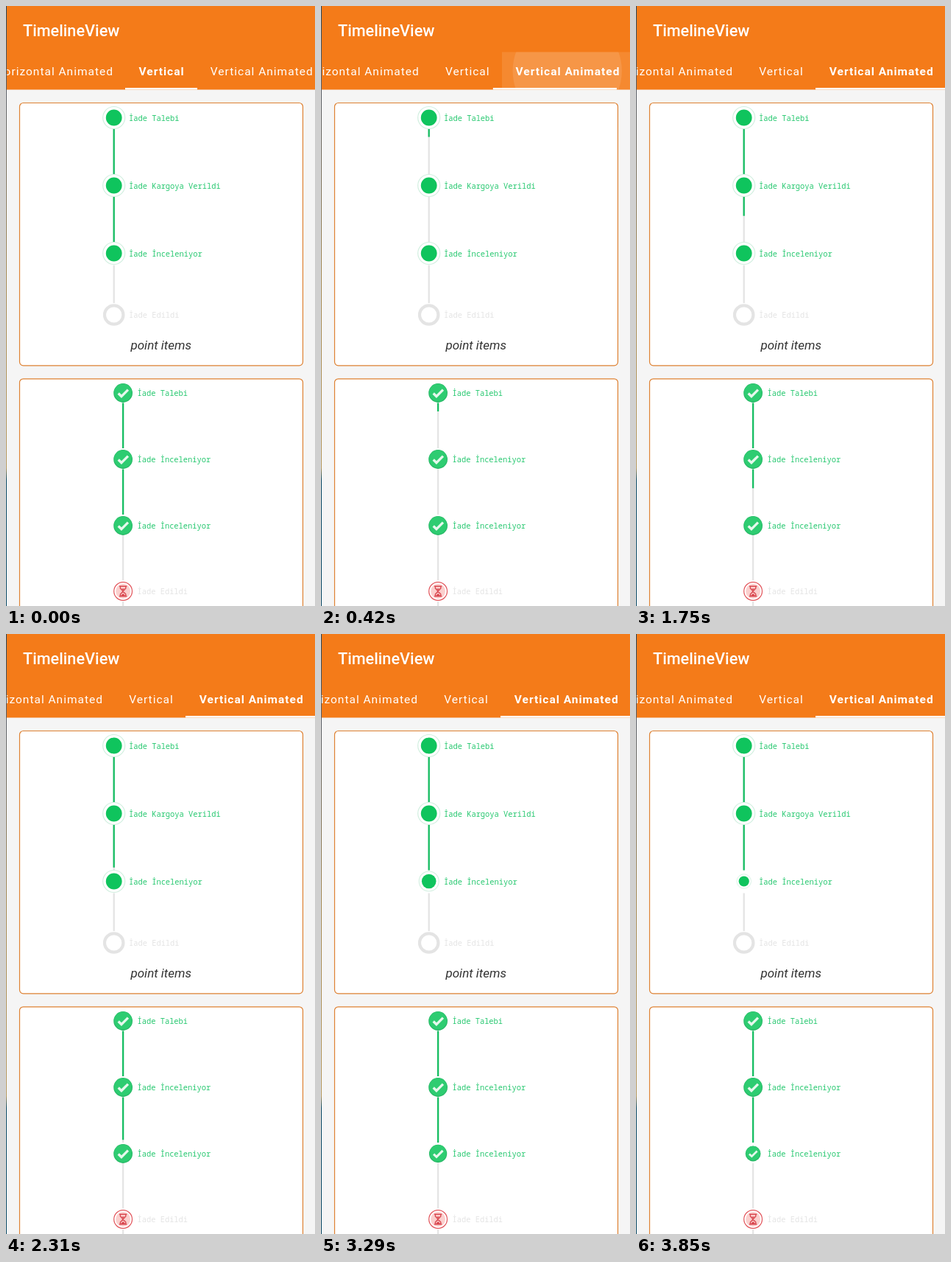
These frames come from a looping animation (420x814 px, 3.92 s). An HTML page:

```html
<!DOCTYPE html>
<html lang="tr">
<head>
<meta charset="utf-8">
<title>TimelineView</title>
<style>
  html, body { margin: 0; width: 100%; height: 100%; overflow: hidden; background: #f5f5f5; }
  svg { display: block; }
  .ui { font-family: Roboto, sans-serif; fill: #fff; }
  .tab { font-size: 15.5px; letter-spacing: 1px; }
  .on { font-weight: 700; }
  .mono { font: 10.4px "Noto Sans Mono", monospace; }
</style>
</head>
<body>
<svg width="420" height="814" viewBox="0 0 420 814">
  <defs>
    <linearGradient id="edge" x2="0" y2="1">
      <stop offset="0" stop-color="#27465a"/>
      <stop offset=".14" stop-color="#5b6068"/>
      <stop offset=".45" stop-color="#a58a55"/>
      <stop offset=".77" stop-color="#b79a60"/>
      <stop offset=".79" stop-color="#0c4a66"/>
      <stop offset="1" stop-color="#0c4a66"/>
    </linearGradient>
    <clipPath id="tabClip"><rect x="258" y="62.5" width="178" height="51"/></clipPath>
  </defs>
  <rect width="420" height="814" fill="#f5f5f5"/>
  <rect width="420" height="113.5" fill="#f47b19"/>
  <text class="ui" x="23" y="41" font-size="21.7" font-weight="500">TimelineView</text>
  <g id="tabs" class="ui tab">
    <g clip-path="url(#tabClip)">
      <rect id="glow" x="258" y="62" width="178" height="52"/>
      <circle id="ripple" cx="347" cy="88"/>
    </g>
    <text x="-14.5" y="94">Horizontal Animated</text>
    <text id="tabA" y="94">Vertical</text>
    <text id="tabB" y="94">Vertical Animated</text>
    <rect id="bar" y="111" height="2.5"/>
  </g>
  <g fill="#fff" stroke="#de8132" stroke-width="1.2">
    <rect x="18.5" y="131.5" width="385" height="356.3" rx="5"/>
    <rect x="18.5" y="505.8" width="385" height="340" rx="5"/>
  </g>
  <g id="lists"></g>
  <text class="ui" x="210.7" y="466" font-size="17" font-style="italic" text-anchor="middle" style="fill:#333">point items</text>
  <rect width="1" height="814" fill="url(#edge)"/>
</svg>
<script>
const LOOP = 3920, STEP = 70, START = 210;
const GREEN = '#16be62', GREY = '#e4e4e4';
const $ = id => document.getElementById(id);

function add(parent, tag, attrs, text) {
  const el = document.createElementNS('http://www.w3.org/2000/svg', tag);
  for (const k in attrs) el.setAttribute(k, attrs[k]);
  if (text) el.textContent = text;
  return parent.appendChild(el);
}
function set(el, attrs) {
  for (const k in attrs) el.setAttribute(k, attrs[k]);
}

// Icons are drawn around 0,0
const icons = {
  dot(g) {
    add(g, 'circle', { r: 15, fill: '#fff', stroke: '#d2efe0', 'stroke-width': 1.2 });
    add(g, 'circle', { r: 10.9, fill: '#0fc45d' });
  },
  empty(g) {
    add(g, 'circle', { r: 12.7, fill: '#fff', stroke: GREY, 'stroke-width': 4.2 });
  },
  check(g) {
    add(g, 'circle', { r: 12.9, fill: '#27b866' });
    add(g, 'circle', { r: 12, cy: -0.6, fill: '#2ecc71' });
    add(g, 'path', { d: 'M-6.4 .6L-2.2 4.6L6.8 -4.4', fill: 'none', stroke: '#e6f8ed', 'stroke-width': 3.4 });
  },
  wait(g) {
    add(g, 'circle', { r: 12.4, fill: '#fff', stroke: '#e2545a', 'stroke-width': 1.2 });
    add(g, 'circle', { r: 10, fill: '#fbcfcd' });
    add(g, 'path', { d: 'M-5.2 -6.7H5.2M-5.2 6.7H5.2M-3.7 -6.5V-4L3.7 4V6.5M3.7 -6.5V-4L-3.7 4V6.5',
      fill: 'none', stroke: '#d94850', 'stroke-width': 1.4 });
    add(g, 'path', { d: 'M-2 -3.5H2L0 -1ZM-3 6L0 3L3 6Z', fill: '#d94850' });
  }
};

const lists = [
  { x: 146.7, tx: 167, depth: 0.9, icon: ['dot', 'empty'], ys: [151.5, 243.5, 335.5, 419],
    names: ['Talebi', 'Kargoya Verildi', 'İnceleniyor', 'Edildi'],
    lines: [[166, 228], [259, 320.5], [351.5, 403]] },
  { x: 159.1, tx: 178.5, depth: 0.5, icon: ['check', 'wait'], ys: [525, 615, 705, 794],
    names: ['Talebi', 'İnceleniyor', 'İnceleniyor', 'Edildi'],
    lines: [[538.5, 600], [628.5, 690], [718, 779.5], [808, 820]] }
];

for (const l of lists) {
  const line = ([y1, y2], stroke) =>
    add($('lists'), 'line', { x1: l.x, x2: l.x, y1, y2, stroke, 'stroke-width': 2.3 });
  l.lines.forEach(s => line(s, GREY));
  l.grow = l.lines.slice(0, 2).map(s => line(s, GREEN));
  l.points = l.ys.map((y, i) => {
    const last = i === 3;
    const g = add($('lists'), 'g', { transform: `translate(${l.x} ${y})` });
    icons[l.icon[+last]](g);
    add($('lists'), 'text', { class: 'mono', x: l.tx, y: y + 4.3, fill: last ? GREY : '#27c870' }, 'İade ' + l.names[i]);
    return g;
  });
}

const ramp = (t, from, to) => Math.min(1, Math.max(0, (t - from) / (to - from)));
const mix = (a, b, p) => a + (b - a) * p;

// cubic-bezier(.4, 0, .2, 1)
function fastOutSlowIn(x) {
  let lo = 0, hi = 1, s;
  for (let i = 0; i < 20; i++) {
    s = (lo + hi) / 2;
    const bx = 1.2 * (1 - s) ** 2 * s + 0.6 * (1 - s) * s * s + s ** 3;
    if (bx < x) lo = s; else hi = s;
  }
  return 3 * (1 - s) * s * s + s ** 3;
}

function drawTabs(t, active) {
  const p = active ? fastOutSlowIn(ramp(t, START, 560)) : 0;
  const left = mix(162, 258, p);
  set($('tabs'), { transform: `translate(${-14 * p} 0)` });
  set($('bar'), { x: left, width: mix(260, 436, p) - left });
  set($('tabA'), { x: active ? 181.2 : 180.5, class: active ? '' : 'on' });
  set($('tabB'), { x: active ? 276.8 : 277.8, class: active ? 'on' : '' });
  set($('glow'), { opacity: active ? 0.1 * (1 - ramp(t, 980, 1190)) : 0 });
  set($('ripple'), {
    r: mix(20, 100, ramp(t, START, 520)),
    opacity: active ? 0.11 * (1 - ramp(t, 420, 700)) : 0
  });
}

function drawLists(t, active) {
  const fill = [ramp(t, 210, 1330), ramp(t, 1300, 2375)];
  const phase = Math.max(0, t - 2419) / 224 % 2;
  const dip = 1 - Math.abs(1 - phase);
  for (const l of lists) {
    l.grow.forEach((el, i) => set(el, { y2: mix(...l.lines[i], active ? fill[i] : 1) }));
    set(l.points[2], { transform: `translate(${l.x} ${l.ys[2]}) scale(${1 - l.depth * dip})` });
  }
}

function draw(now) {
  const t = Math.floor(now % LOOP / STEP) * STEP;
  drawTabs(t, t >= START);
  drawLists(t, t >= START);
}

let origin;
function tick(now) {
  origin ??= now;
  draw(now - origin);
  requestAnimationFrame(tick);
}
draw(0);
requestAnimationFrame(tick);
</script>
</body>
</html>
```
